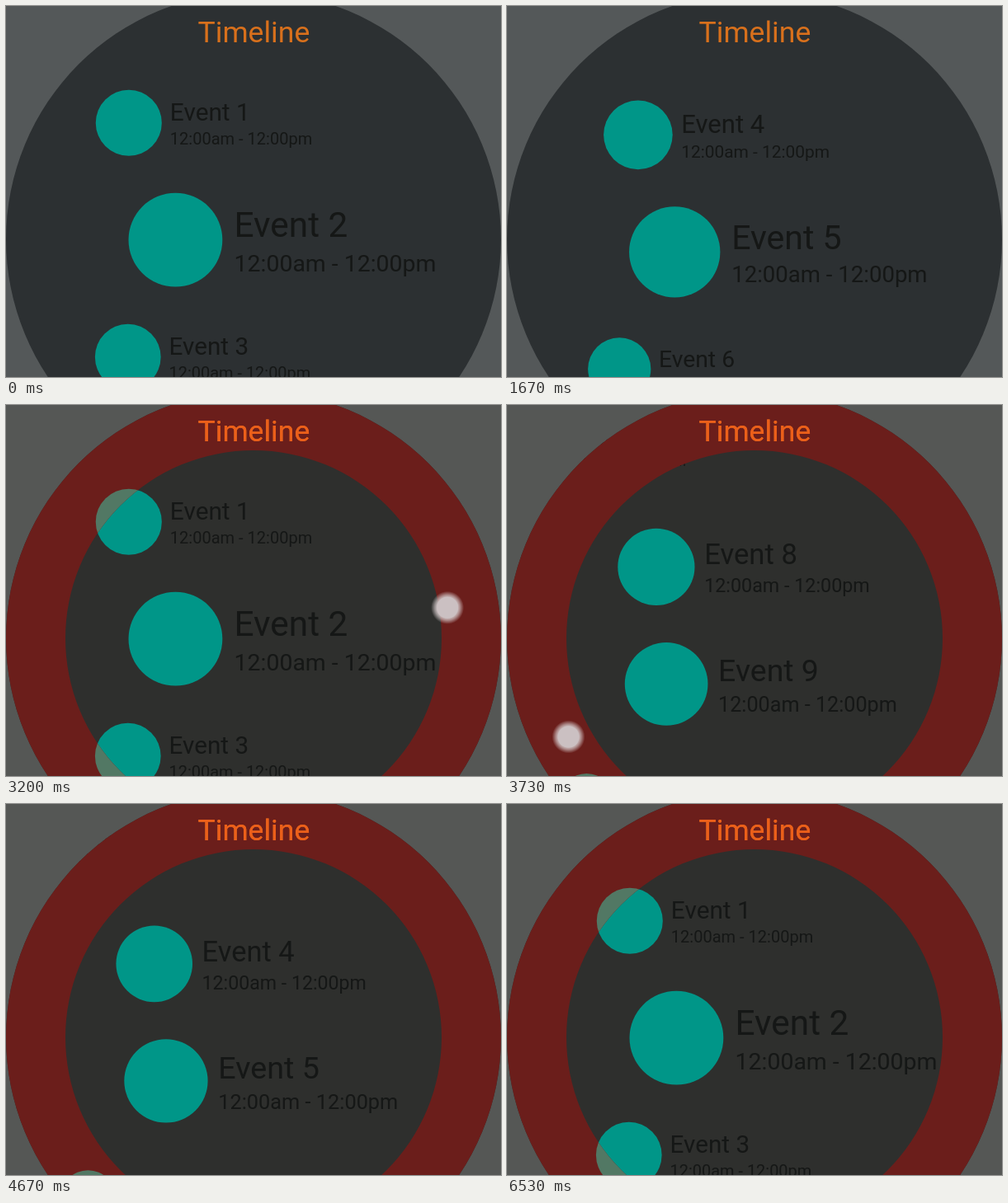
An HTML page with a canvas that plays this animation: 600x450 px, repeating every 7070 ms.

```html
<!DOCTYPE html>
<html lang="en">
<head>
<meta charset="utf-8">
<title>Timeline</title>
<style>
  html, body { margin: 0; width: 100%; height: 100%; overflow: hidden; background: #545756; }
  canvas { display: block; }
</style>
</head>
<body>
<canvas id="stage" width="600" height="450"></canvas>
<script>
const ctx = document.getElementById('stage').getContext('2d');
const LOOP = 7070, CX = 300, CY = 283, FACE = 300, INNER = 228, GAP = 142;
const TEAL = '#009688';

const part = (t, from, to) => Math.min(1, Math.max(0, (t - from) / (to - from)));
const smooth = p => p * p * (3 - 2 * p);
const out = p => 1 - (1 - p) ** 2;
const mix = (a, b, p) => a + (b - a) * p;

// List position in pixels; negative values are overscroll at the top.
function scrollAt(t) {
  if (t < 1930) return 426 * smooth(part(t, 1200, 1730));
  if (t < 2130) return mix(426, -36, smooth(part(t, 1930, 2130)));
  if (t < 3200) return -36 * (1 - out(part(t, 2130, 2333)));
  if (t < 3950) return 1183 * smooth(part(t, 3200, 3950));
  if (t < 5333) return mix(1183, -36, smooth(part(t, 3950, 5130)));
  return -36 * (1 - out(part(t, 5333, 6000)));
}

function touchAt(t, scroll) {
  if (t >= 1200 && t < 1470) return [396, mix(313, 120, smooth(part(t, 1200, 1470)))];
  if (t >= 1930 && t < 2130) return [396, mix(190, 390, smooth(part(t, 1930, 2130)))];
  if (t >= 3200 && t < 4660) {
    const turn = (scroll * 0.1715 - 9) * Math.PI / 180;
    const r = 238 + 19 * Math.min(1, scroll / 1040);
    return [CX + r * Math.cos(turn), CY + r * Math.sin(turn)];
  }
}

function disc(x, y, r, color) {
  ctx.fillStyle = color;
  ctx.beginPath();
  ctx.arc(x, y, r, 0, 7);
  ctx.fill();
}

function label(text, x, y, size, color) {
  ctx.font = `${size}px Roboto, sans-serif`;
  ctx.fillStyle = color;
  ctx.fillText(text, x, y);
}

function ringPath() {
  ctx.beginPath();
  ctx.arc(CX, CY, FACE, 0, 2 * Math.PI);
  ctx.arc(CX, CY, INNER, 0, 2 * Math.PI);
}

// Rows shrink and follow a curve as they leave the middle.
function eachRow(scroll, draw) {
  const first = Math.max(1, Math.floor(scroll / GAP));
  for (let n = first; n < first + 5; n++) {
    const y = CY + 0.7 + (n - 2) * GAP - scroll;
    const d = Math.abs(y - CY);
    if (d > 260) continue;
    const r = 57 - 0.12 * d;
    const left = 148.5 - 271 + Math.sqrt(271 ** 2 - d * d);
    draw(n, left + r, y, r);
  }
}

function drawRow(n, x, y, r) {
  disc(x, y, r, TEAL);
  const textX = x + 1.25 * r;
  label(`Event ${n}`, textX, y - 0.065 * r, 0.744 * r, '#151716');
  label('12:00am - 12:00pm', textX, y + 0.665 * r, 0.5 * r, '#151716');
}

function drawRing(scroll, alpha) {
  ctx.save();
  ctx.globalAlpha = alpha;
  ringPath();
  ctx.clip('evenodd');
  ctx.fillStyle = '#6b1e1b';
  ctx.fillRect(0, 0, 600, 450);
  eachRow(scroll, (n, x, y, r) => disc(x, y, r, '#527864'));
  ctx.restore();
}

function drawTitle(glow, ring) {
  ctx.textAlign = 'center';
  const layers = [['#d8701c', 1], ['#b8774f', glow], ['#ec5f1a', ring]];
  for (const [color, alpha] of layers) {
    ctx.globalAlpha = alpha;
    label('Timeline', CX + 0.4, 44.4, 35.6, color);
  }
  ctx.globalAlpha = 1;
  ctx.textAlign = 'left';
}

function drawTouch(x, y) {
  const halo = ctx.createRadialGradient(x, y, 12, x, y, 20);
  halo.addColorStop(0, '#d0c5c6');
  halo.addColorStop(0.4, 'rgba(208,197,198,.65)');
  halo.addColorStop(1, 'rgba(208,197,198,0)');
  disc(x, y, 20, halo);
  disc(x, y, 13, '#cbc0c2');
}

function render(t) {
  const scroll = scrollAt(t);
  const ring = part(t, 2640, 3000);
  const glow = smooth(part(t, 2090, 2230)) * (1 - smooth(part(t, 2300, 2600)));
  const [back, face] = t < 1730 ? ['#545859', '#2c3032'] : ['#555755', '#2e2f2d'];

  ctx.fillStyle = back;
  ctx.fillRect(0, 0, 600, 450);
  ctx.save();
  ctx.beginPath();
  ctx.arc(CX, CY, FACE, 0, 7);
  ctx.clip();
  ctx.fillStyle = face;
  ctx.fillRect(0, 0, 600, 450);
  eachRow(scroll, drawRow);
  if (glow) {
    ctx.globalAlpha = Math.min(1, glow * 1.5);
    disc(305, 92 * glow - 994, 994, '#343c6e');
    ctx.globalAlpha = 1;
  }
  ctx.restore();

  if (ring) drawRing(scroll, ring);
  drawTitle(glow, ring);
  const touch = touchAt(t, scroll);
  if (touch) drawTouch(...touch);
}

const start = performance.now();
function tick() {
  render((performance.now() - start) % LOOP);
  requestAnimationFrame(tick);
}
tick();
</script>
</body>
</html>
```
